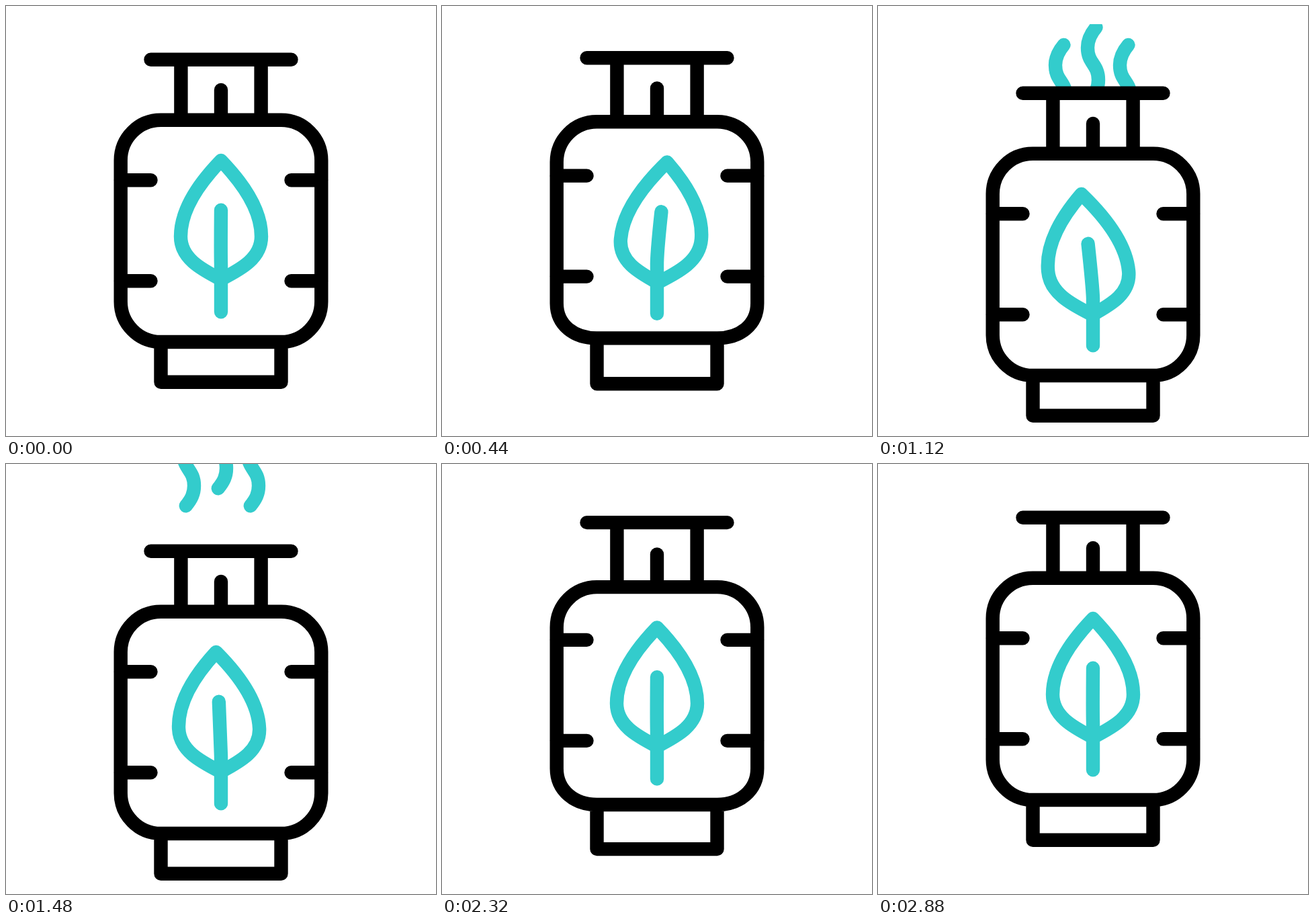
Animation, 640 px wide and 640 px high, one loop 3 s. Source, as an HTML page:

```html
<!DOCTYPE html>
<html lang="en">
<head>
<meta charset="utf-8">
<title>Eco gas cylinder</title>
<style>
  html, body { margin: 0; width: 100%; height: 100%; overflow: hidden; background: #fff; }
  svg { display: block; width: 100vw; height: 100vh; }
  path { fill: none; stroke: #000; stroke-width: 20.4; stroke-linecap: round; stroke-linejoin: round; }
  .eco path { stroke: #3cc; }
</style>
</head>
<body>
<svg viewBox="0 0 640 640">
  <clipPath id="vent"><rect id="ventBox" x="0" width="640"/></clipPath>
  <g class="eco" clip-path="url(#vent)">
    <g id="smoke">
      <path id="wisp" d="M324.5 0C316 10 312 19 312 30C312 42 316 48 320 54S328 66 328 78S324 98 315.8 108"/>
      <path class="side" transform="translate(-48 26)"/>
      <path class="side" transform="translate(48 26)"/>
    </g>
  </g>
  <g id="tank">
    <path id="handle"/>
    <path id="valve" d="M320 125V165"/>
    <path id="body"/>
    <path id="ticks" d="M171 259.3H215.5M171 409.3H215.5M469 259.3H424.5M469 409.3H424.5"/>
    <g class="eco">
      <path id="leaf"/>
      <path id="stem"/>
    </g>
  </g>
</svg>
<script>
const LOOP = 3000, STEP = 40, LAST = 2880;
const $ = id => document.getElementById(id);
const move = (id, y) => $(id).setAttribute('transform', `translate(0 ${y})`);
const shape = (id, d) => $(id).setAttribute('d', d);

// Smooth step from 0 to 1 between two times.
function ramp(t, from, to) {
  const p = Math.min(1, Math.max(0, (t - from) / (to - from)));
  return p * p * (3 - 2 * p);
}

const lowered = t => ramp(t, 360, 560) - ramp(t, 2120, 2520);
const leap = t => ramp(t, 2120, 2520) - ramp(t, 2520, LAST);
const stretch = t => ramp(t, 0, 360) - ramp(t, 360, 560) + leap(t);
// Loose parts fall back sooner and overshoot a little.
const recoil = t => ramp(t, 0, 360) - 1.15 * ramp(t, 360, 520) + 0.15 * ramp(t, 520, 600) + leap(t);
const swing = t => ramp(t, 0, 640) - 2 * ramp(t, 640, 1200) + ramp(t, 1200, 1680);

function drawTank(t) {
  const bar = 79.8 - 12 * recoil(t);
  const floor = 500 - 12.6 * stretch(t);
  move('tank', 50 * lowered(t) - 23.3 * stretch(t));
  move('ticks', -21.6 * recoil(t));
  move('valve', -7.8 * stretch(t));
  shape('handle', `M215.5 ${bar}H424.5M260.4 ${bar}V165M379.6 ${bar}V165`);
  shape('body', `M230.3 169.8H409.7A59.6 60 0 0 1 469.3 229.8V440
    C469.3 473 442.5 ${floor} 409.7 ${floor}H230.3
    C197.5 ${floor} 170.7 473 170.7 440V229.8A59.6 60 0 0 1 230.3 169.8Z
    M230.5 ${floor}V559.8H409.5V${floor}`);
}

function drawLeaf(t) {
  const sway = 19 * swing(t);
  // Leans the leaf from its base and lengthens it slightly below the tip.
  const bend = (x, y) => {
    const down = (y - 230) / 177;
    return `${x + sway * (1.02 - 0.96 * down)} ${y + 0.16 * Math.abs(sway) * down} `;
  };
  const half = s => 'M' + bend(320, 230) +
    'C' + bend(320 - 30 * s, 261) + bend(320 - 60 * s, 302) + bend(320 - 60 * s, 343) +
    'C' + bend(320 - 60 * s, 375) + bend(320 - 31 * s, 391) + bend(320, 407);
  shape('leaf', half(1) + half(-1));
  shape('stem', `M320 455.3V385Q319.5 368 ${320 + sway * 0.44} 303.8`);
}

function drawSmoke(t) {
  const dt = t - 800;
  const top = 110 - 0.223 * dt - 6.5e-5 * dt * dt;
  const box = $('ventBox');
  move('smoke', top);
  box.setAttribute('y', top - 5);
  box.setAttribute('height', t >= 560 && t < 1720 ? Math.max(0, 135 - top) : 0);
}

function frame(now) {
  const t = Math.min(LAST, Math.floor(now % LOOP / STEP) * STEP);
  drawTank(t);
  drawLeaf(t);
  drawSmoke(t);
  requestAnimationFrame(() => frame(performance.now() - start));
}

document.querySelectorAll('.side').forEach(el => el.setAttribute('d', $('wisp').getAttribute('d')));
const start = performance.now();
frame(0);
</script>
</body>
</html>
```
